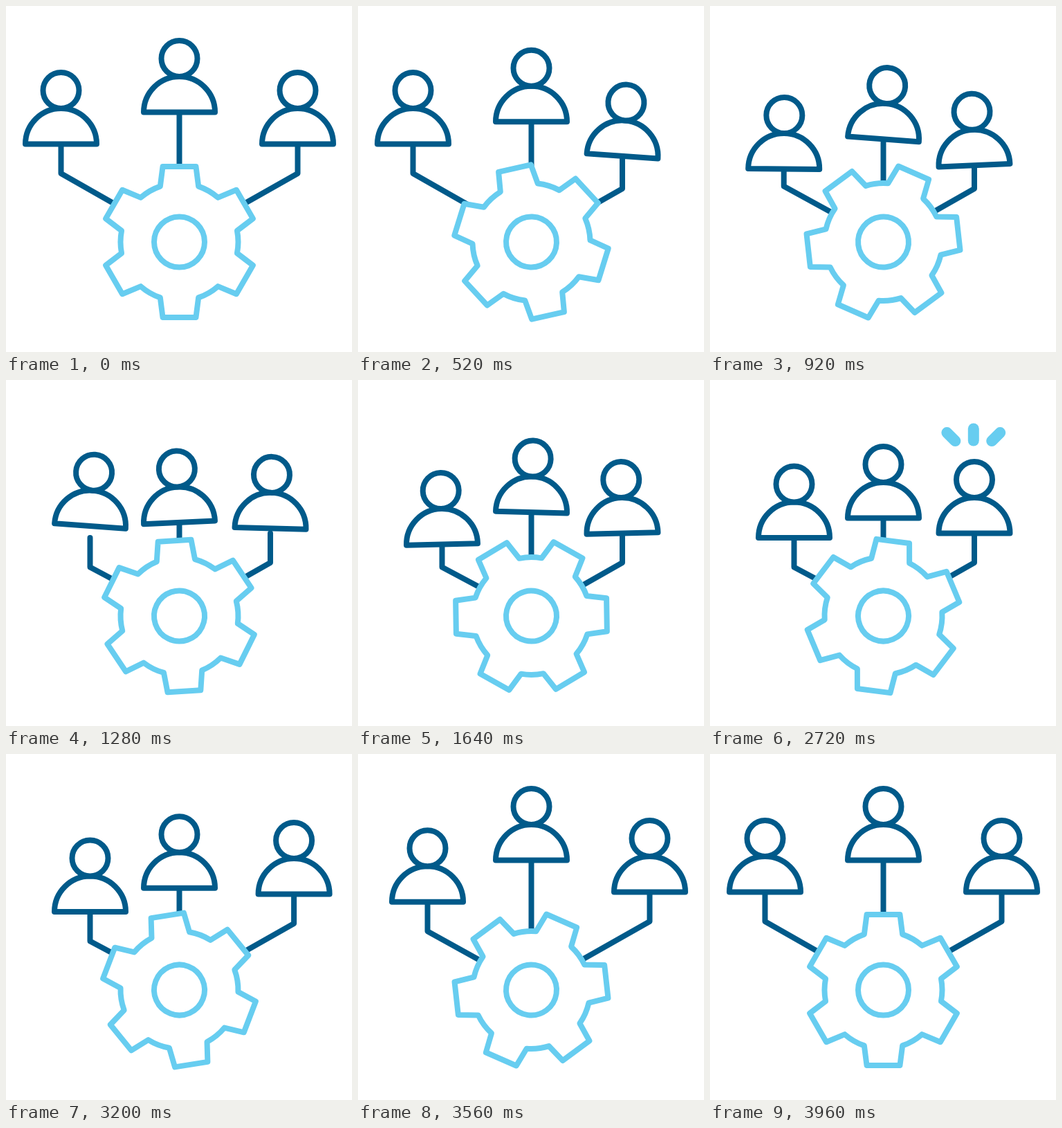
An HTML page with a canvas that plays this animation: 500 by 500 pixels, repeating every 4 s.

```html
<!DOCTYPE html>
<html lang="en">
<head>
<meta charset="utf-8">
<title>Team and gear</title>
<style>
  html, body { margin: 0; width: 100%; height: 100%; overflow: hidden; background: #fff; }
  canvas { display: block; width: 100vmin; height: 100vmin; }
</style>
</head>
<body>
<canvas id="stage" width="500" height="500"></canvas>
<script>
const ctx = document.getElementById('stage').getContext('2d');
const DARK = '#005a8a', LIGHT = '#67cdf0';
const LOOP = 4000, STEP = 40, RAD = Math.PI / 180;
const HUB = { x: 250.5, y: 341 };

// out: resting base of the figure, near: base when pulled in; times in ms
const people = [
  { out: [79.5, 199.5], near: [121.5, 228], bend: true, go: 680, back: 3345, spark: 2160 },
  { out: [250.5, 153.5], near: [250.5, 199.5], bend: false, go: 420, back: 3105, spark: 2340 },
  { out: [421.5, 199.5], near: [382, 221.5], bend: true, go: 40, back: 2870, spark: 2520 }
];

// [ms since start, value]
const BOB = [[0, 0], [240, 17.5], [660, -19], [930, 11.5], [1100, -13], [1400, 0]];
const TILT = [[160, 0], [560, 4.5], [850, -2.7], [1150, 1.8], [1580, -1.3], [1900, 0]];

const clamp = u => Math.max(0, Math.min(1, u));
const smooth = u => { u = clamp(u); return u * u * (3 - 2 * u); };
const easeOut = u => Math.sin(clamp(u) * Math.PI / 2);
const mix = (a, b, u) => a + (b - a) * u;

function track(keys, t) {
  if (t <= keys[0][0]) return keys[0][1];
  for (let i = 1; i < keys.length; i++) {
    const [t0, a] = keys[i - 1], [t1, b] = keys[i];
    if (t < t1) return mix(a, b, smooth((t - t0) / (t1 - t0)));
  }
  return keys[keys.length - 1][1];
}

function line(points, color, width) {
  ctx.beginPath();
  points.forEach(([x, y]) => ctx.lineTo(x, y));
  ctx.strokeStyle = color;
  ctx.lineWidth = width;
  ctx.stroke();
}

function outline(color) {
  ctx.fillStyle = '#fff';
  ctx.strokeStyle = color;
  ctx.lineWidth = 8;
  ctx.fill();
  ctx.stroke();
}

// Bent poles travel with the figure; the straight one stands still behind it.
function drawPole(p, x, y) {
  if (p.bend) line([[x, y], [x, y + 42.5], [250, 339]], DARK, 8);
  else line([p.out, [x, 300]], DARK, 8);
}

function drawFigure(x, y, tilt) {
  ctx.save();
  ctx.translate(x, y);
  ctx.rotate(tilt * RAD);
  ctx.beginPath();
  ctx.arc(0, 0, 51.5, Math.PI, 0);
  ctx.closePath();
  outline(DARK);
  ctx.beginPath();
  ctx.arc(0, -77.5, 26, 0, 2 * Math.PI);
  outline(DARK);
  ctx.restore();
}

function drawSpark(p, t) {
  const head = 19 * easeOut((t - p.spark) / 200);
  const tail = 19 * smooth((t - p.spark - 160) / 200);
  if (head <= 0 || tail >= 19) return;
  const [x, y] = p.near;
  for (const side of [-1, 0, 1]) {
    const k = side ? Math.SQRT1_2 : 1;
    const at = d => [x - 1.2 + side * (25 + d * k), y - 132 - d * k];
    line([at(tail), at(head)], LIGHT, 16);
  }
}

function drawGear(angle) {
  ctx.save();
  ctx.translate(HUB.x, HUB.y);
  ctx.rotate(angle * RAD);
  ctx.beginPath();
  for (let i = 0; i < 6; i++) {
    const mid = i * 60 - 90;
    for (const off of [-12.4, 12.4]) {
      const a = (mid + off) * RAD;
      ctx.lineTo(111.6 * Math.cos(a), 111.6 * Math.sin(a));
    }
    ctx.arc(0, 0, 85, (mid + 19) * RAD, (mid + 41) * RAD);
  }
  ctx.closePath();
  outline(LIGHT);
  ctx.beginPath();
  ctx.arc(0, 0, 36.5, 0, 2 * Math.PI);
  outline(LIGHT);
  ctx.restore();
}

function draw(t) {
  ctx.fillStyle = '#fff';
  ctx.fillRect(0, 0, 500, 500);
  ctx.lineCap = ctx.lineJoin = 'round';
  for (const p of people) {
    const pull = smooth((t - p.go) / 400) - smooth((t - p.back) / 430);
    const x = mix(p.out[0], p.near[0], pull);
    const y = mix(p.out[1], p.near[1], pull);
    drawPole(p, x, y);
    drawFigure(x, y + track(BOB, t - p.go), track(TILT, t - p.go));
    drawSpark(p, t);
  }
  drawGear(360 * t / (LOOP - STEP));
}

const start = performance.now();
function tick() {
  const t = (performance.now() - start) % LOOP;
  draw(Math.floor(t / STEP) * STEP);
  requestAnimationFrame(tick);
}
tick();
</script>
</body>
</html>
```
